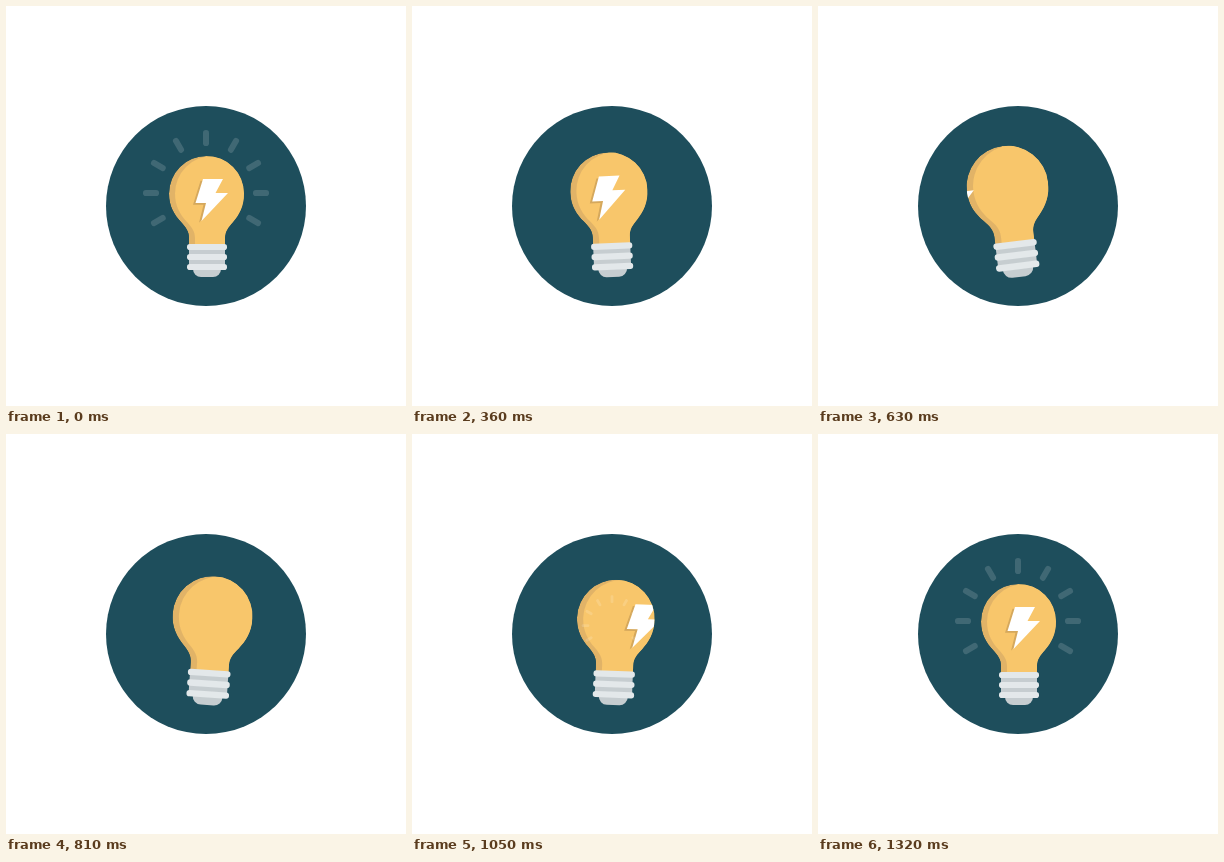
These frames come from a looping animation (400 px wide and 400 px high, 1.59 s). An HTML page:

```html
<!DOCTYPE html>
<html lang="en">
<head>
<meta charset="utf-8">
<title>Light bulb</title>
<style>
  html, body { margin: 0; width: 100%; height: 100%; overflow: hidden; background: #fff; }
  svg { display: block; width: 100vw; height: 100vh; }
</style>
</head>
<body>
<svg viewBox="0 0 400 400">
  <defs>
    <path id="glass" d="M163 187.5a37.5 37.5 0 0 1 75 0c0 13-5 21.500-11 28.500-5 5.500-8 9.500-8 16v9h-36v-9c0-6.500-3-10.500-8-16-6.500-7-12-15.500-12-28.500z"/>
    <path id="flash" d="M197 173h20l-7.500 14h12.500l-26.500 28 4.500-18h-10.500z"/>
    <clipPath id="inGlass"><use href="#glass"/></clipPath>
    <clipPath id="inDisc"><circle cx="200" cy="200" r="100"/></clipPath>
  </defs>
  <circle cx="200" cy="200" r="100" fill="#1e4e5c"/>
  <g id="bulb">
    <g clip-path="url(#inGlass)">
      <use href="#glass" fill="#e1b367"/>
      <use href="#glass" x="6" fill="#f8c66b"/>
      <g id="bolt">
        <use href="#flash" x="-2.5" y="1.800" fill="#d5a85c"/>
        <use href="#flash" fill="#fff"/>
      </g>
    </g>
    <path d="M187 262h28v1a8 8 0 0 1-8 8h-12a8 8 0 0 1-8-8z" fill="#c6cdd0"/>
    <rect x="183" y="239" width="36" height="24" fill="#c6cdd0"/>
    <g fill="#e3e8ea">
      <rect x="181" y="238" width="40" height="6" rx="2.800"/>
      <rect x="181" y="248" width="40" height="6" rx="2.800"/>
      <rect x="181" y="258" width="40" height="6" rx="2.800"/>
    </g>
  </g>
  <g clip-path="url(#inDisc)">
    <g id="rays" fill="#fff" fill-opacity=".15"></g>
  </g>
</svg>
<script>
const LOOP = 1590, STEP = 30, REST = 1320;
const el = id => document.getElementById(id);
const bulb = el('bulb'), bolt = el('bolt'), rays = el('rays');

for (let a = -120; a <= 120; a += 30) {
  const ray = document.createElementNS('http://www.w3.org/2000/svg', 'rect');
  const attrs = { x: 197, y: 124, width: 6, height: 16, rx: 2.8, transform: `rotate(${a} 200 187)` };
  for (const k in attrs) ray.setAttribute(k, attrs[k]);
  rays.append(ray);
}

const part = (t, a, b) => Math.min(1, Math.max(0, (t - a) / (b - a)));
const sine = u => (1 - Math.cos(Math.PI * u)) / 2;
const quad = u => u < .5 ? 2 * u * u : 1 - 2 * (1 - u) ** 2;

function tilt(t) {
  return -7.1 * quad(part(t, 180, 615))
    + 14.2 * sine(part(t, 615, 900))
    - 7.1 * sine(part(t, 900, 1140));
}

function swell(t) {
  return 1 + .09 * (quad(part(t, 180, 615)) - part(t, 630, REST));
}

// Leans right, leaves to the left, comes back from the right
function boltShift(t) {
  if (t < 165) return 2.6 * (1 - (1 - t / 165) ** 2);
  if (t < 750) return 2.6 - 55.1 * ((t - 165) / 465) ** 2.2;
  return 22 * ((REST - t) / 270) ** 2;
}

// Fly out past the disc, then grow again from inside the bulb
function rayScale(t) {
  if (t < 600) return 1 + .055 * (t / 150) ** 3.7;
  return 1 - (1 - part(t, 945, REST)) ** 2;
}

function draw(ms) {
  const t = Math.min(REST, Math.floor(ms % LOOP / STEP) * STEP);
  bulb.setAttribute('transform',
    `translate(200.5 271) rotate(${tilt(t)}) scale(${swell(t)}) translate(-200.5 -271)`);
  bolt.setAttribute('transform', `translate(${boltShift(t)} 0)`);
  const s = rayScale(t);
  rays.setAttribute('display', s > 0 && s < 3 ? 'inline' : 'none');
  rays.setAttribute('transform', `translate(200 196) scale(${s}) translate(-200 -196)`);
}

const start = performance.now();
function tick() {
  draw(performance.now() - start);
  requestAnimationFrame(tick);
}
draw(0);
requestAnimationFrame(tick);
</script>
</body>
</html>
```
